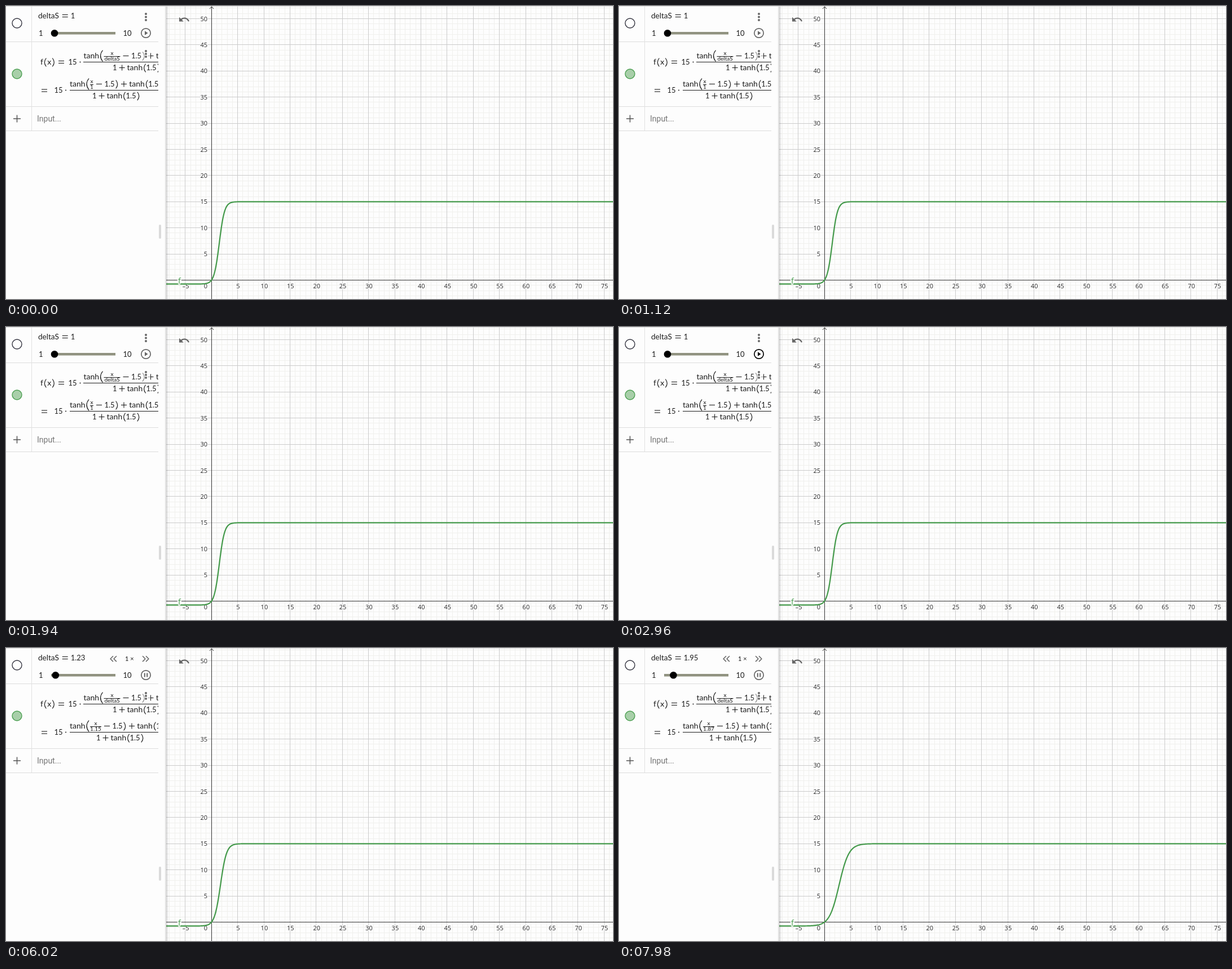
These frames come from a looping animation (1076 px wide and 520 px high, 8000 ms). An HTML page with a canvas:

```html
<!DOCTYPE html>
<html lang="en">
<head>
<meta charset="utf-8">
<title>Slider and function graph</title>
<style>
  html, body { margin: 0; width: 100%; height: 100%; overflow: hidden; background: #fdfdfd; }
  canvas { display: block; }
</style>
</head>
<body>
<canvas id="stage" width="1076" height="520"></canvas>
<script>
const ctx = document.getElementById('stage').getContext('2d');
const LOOP = 8000, W = 1076, H = 520, PANEL = 284, CLIP = 270;
const UNIT = 9.28, X0 = 364.2, Y0 = 486.5;
const INK = '#1c1c1c', GREY = '#666', GREEN = '#43994a', PAPER = '#fdfdfd';
const MATH = 'Lato, sans-serif', AXIS = '"Open Sans", sans-serif';
const undoIcon = new Path2D('M12.5 8c-2.65 0-5.05.99-6.9 2.6L2 7v9h9l-3.62-3.62c1.39-1.16 3.16-1.88 5.12-1.88 3.54 0 6.55 2.31 7.6 5.5l2.37-.78C21.08 11.03 17.15 8 12.5 8z');

const clamp01 = v => Math.min(1, Math.max(0, v));
const crisp = v => Math.floor(v) + 0.5;
const format = v => String(+v.toFixed(2));

function line(points, color = INK, width = 1) {
  ctx.beginPath();
  points.forEach(([x, y]) => ctx.lineTo(x, y));
  ctx.strokeStyle = color;
  ctx.lineWidth = width;
  ctx.stroke();
}

function rect(x, y, w, h, color) {
  ctx.fillStyle = color;
  ctx.fillRect(x, y, w, h);
}

function circle(x, y, r, fill, stroke, width = 1.4) {
  ctx.beginPath();
  ctx.arc(x, y, r, 0, 7);
  if (fill) { ctx.fillStyle = fill; ctx.fill(); }
  if (stroke) { ctx.strokeStyle = stroke; ctx.lineWidth = width; ctx.stroke(); }
}

function text(s, x, y, { size = 14, font = MATH, color = INK, align = 'left', halo = 0 } = {}) {
  ctx.font = `${size}px ${font}`;
  ctx.textAlign = align;
  if (halo) {
    ctx.strokeStyle = PAPER;
    ctx.lineWidth = halo;
    ctx.lineJoin = 'round';
    ctx.strokeText(s, x, y);
  }
  ctx.fillStyle = color;
  ctx.fillText(s, x, y);
}

const number = (s, x, y) => text(s, x, y, { size: 13 });

// Operators are centred on the maths axis, 4.5 px above the baseline.
const minus = (x, y) => line([[x, y - 4.5], [x + 10, y - 4.5]], INK, 1.1);
function plus(x, y) {
  minus(x, y);
  line([[x + 5, y - 9.5], [x + 5, y + 0.5]], INK, 1.1);
}
function equals(x, y) {
  for (const dy of [-6.5, -2.5]) line([[x, y + dy], [x + 10, y + dy]], INK, 1.1);
}

function paren(x, y, height, bulge) {
  ctx.beginPath();
  ctx.moveTo(x, y - height / 2);
  ctx.quadraticCurveTo(x + bulge * 2, y, x, y + height / 2);
  ctx.strokeStyle = INK;
  ctx.lineWidth = 1.2;
  ctx.stroke();
}

function tanhConstant(x, y) {
  text('tanh', x, y);
  paren(x + 33, y - 4, 15, -3);
  number('1.5', x + 33.9, y);
  paren(x + 54.2, y - 4, 15, 3);
}

function onePlusTanh(x, y) {
  number('1', x, y);
  plus(x + 11.6, y);
  tanhConstant(x + 25.6, y);
}

// tanh(x / divisor − 1.5) + tanh(1.5)
function numerator(x, y, divisor, width) {
  const left = x + 36, right = left + width, middle = left + width / 2;
  text('tanh', x, y);
  paren(x + 34, y - 4.5, 20, -4);
  text('x', middle, y - 6.5, { size: 10, align: 'center' });
  line([[left, y - 3.5], [right, y - 3.5]]);
  text(divisor, middle, y + 4, { size: 10, align: 'center' });
  minus(right + 5, y);
  number('1.5', right + 19.5, y);
  paren(right + 39.7, y - 4, 15, 3);
  plus(right + 49, y);
  tanhConstant(right + 63.3, y);
}

function dots(x, y, gap) {
  for (const k of [-1, 0, 1]) circle(x, y + k * gap, 2, GREY);
}

function gridLines(step, color) {
  for (let n = Math.ceil(-9 / step) * step; n < 78; n += step) {
    const x = crisp(X0 + n * UNIT), y = crisp(Y0 - n * UNIT);
    line([[x, 0], [x, H]], color);
    if (y > 0 && y < H) line([[PANEL, y], [W, y]], color);
  }
}

function drawGraph(delta) {
  const axisX = crisp(X0);
  gridLines(1, '#f0f0ed');
  gridLines(5, '#cbcbcb');
  line([[PANEL, Y0], [W, Y0]], '#333');
  line([[axisX, 0], [axisX, H]], '#333');
  line([[axisX - 3.5, 5], [axisX, 1], [axisX + 3.5, 5]], '#333');

  const label = { size: 11, font: AXIS, color: '#222', halo: 3 };
  for (let n = -5; n <= 75; n += 5) {
    const caption = String(n).replace('-', '–');
    if (n) text(caption, X0 + n * UNIT + 0.9, 501, { ...label, align: 'center' });
    if (n > 0 && n <= 50) text(caption, 357, Math.round(Y0 - n * UNIT + 4), { ...label, align: 'right' });
  }
  text('0', 357, 501, { ...label, align: 'right' });

  const shift = Math.tanh(1.5), curve = [];
  for (let px = PANEL - 2; px <= W + 2; px++) {
    const x = (px - X0) / UNIT;
    const y = 15 * (Math.tanh(x / delta - 1.5) + shift) / (1 + shift);
    curve.push([px, Y0 - y * UNIT]);
  }
  line(curve, GREEN, 2.2);
  text('f', 305, 493, { size: 14, font: AXIS, color: GREEN, halo: 3 });

  ctx.save();
  ctx.translate(305.2, 13.5);
  ctx.scale(0.88, 0.88);
  ctx.fillStyle = GREY;
  ctx.fill(undoIcon);
  ctx.restore();
}

function drawPanelFrame() {
  rect(0, 0, PANEL, H, PAPER);
  const shade = ctx.createLinearGradient(281, 0, 288, 0);
  shade.addColorStop(0, 'rgba(0,0,0,0)');
  shade.addColorStop(0.45, 'rgba(0,0,0,.16)');
  shade.addColorStop(1, 'rgba(0,0,0,0)');
  rect(281, 0, 7, H, shade);
  line([[0, 0.5], [W, 0.5]], '#dedede');
  for (const y of [63.5, 178.5, 221.5]) line([[0, y], [CLIP, y]], '#dcdcdc');
  line([[45.5, 0], [45.5, 221]], '#e2e2e2');

  ctx.beginPath();
  ctx.roundRect(271, 388, 4, 25, 2);
  ctx.fillStyle = '#dadada';
  ctx.fill();

  circle(19.5, 30.5, 8.5, '#fff', '#33333f');
  circle(19.5, 120.5, 8.5, '#a8cfa9', '#4c9f52');
  line([[13, 200], [26, 200]], '#555', 1.5);
  line([[19.5, 193.5], [19.5, 206.5]], '#555', 1.5);
  text('Input...', 55, 204.5, { font: 'Roboto, sans-serif', color: '#757575' });
}

function drawPlayButton(playing, hovered) {
  const color = hovered ? '#000' : GREY;
  circle(248, 48, 8.2, null, color, 1.7);
  if (playing) {
    rect(244.8, 44.5, 2, 7, color);
    rect(249.2, 44.5, 2, 7, color);
  } else {
    ctx.beginPath();
    ctx.moveTo(246, 44.2);
    ctx.lineTo(251.5, 48);
    ctx.lineTo(246, 51.8);
    ctx.fillStyle = color;
    ctx.fill();
  }
}

function chevrons(x, dir) {
  for (const dx of [-3, 3])
    line([[x + dx - dir * 2.4, 14.3], [x + dx + dir * 2.4, 19.2], [x + dx - dir * 2.4, 24.1]], GREY, 1.6);
}

function drawSlider(t, shown, delta) {
  text('deltaS', 57, 22, { size: 13.6 });
  equals(99.7, 22);
  number(format(shown), 114.7, 22);
  number('1', 58, 53);
  number('10', 207.5, 53);
  rect(80, 46, 114, 4.5, '#909280');
  circle(86 + (delta - 1) * 12, 48.2, 6.3, '#000');
  drawPlayButton(t >= 4920, t >= 2540 && t < 5720);

  const reveal = clamp01((t - 4890) / 450);
  ctx.globalAlpha = 1 - clamp01((t - 4920) / 300);
  dots(248, 19.5, 5.5);
  ctx.globalAlpha = reveal;
  chevrons(190.5, -1);
  text('1 ×', 211, 23, { size: 11 });
  chevrons(247.5, 1);
  ctx.globalAlpha = 1;
}

function drawFormulas(delta) {
  ctx.save();
  ctx.beginPath();
  ctx.rect(0, 64, CLIP, 114);
  ctx.clip();

  text('f', 61, 104);
  paren(71.3, 100, 15, -3);
  text('x', 73.3, 104);
  paren(82.3, 100, 15, 3);
  equals(93, 104);
  number('15', 110.5, 104);
  circle(131.5, 99.5, 1, INK);
  line([[137, 99.5], [CLIP, 99.5]]);
  numerator(137.5, 93, 'deltaS', 29);
  onePlusTanh(189, 114);

  const fade = ctx.createLinearGradient(236, 0, 248, 0);
  fade.addColorStop(0, 'rgba(253,253,253,0)');
  fade.addColorStop(1, 'rgba(253,253,253,.75)');
  rect(236, 76, 12, 20, fade);
  rect(248, 76, 8, 20, 'rgba(253,253,253,.6)');
  dots(248, 85, 5);

  const divisor = format(delta);
  const width = [0, 6, 6, 14, 20][divisor.length];
  const widen = width - 6;
  equals(63, 154.5);
  number('15', 85.5, 154);
  circle(106, 149.5, 1, INK);
  line([[113, 149.5], [CLIP, 149.5]]);
  numerator(113, 143, divisor, width);
  onePlusTanh(153 + widen / 2, 164);
  ctx.restore();
}

function draw(t) {
  // The slider label runs two ticks ahead of the drawing.
  const label = 1.55 + 0.04 * Math.floor((t - 6840) / 114);
  const shown = Math.max(1, label), delta = Math.max(1, label - 0.08);
  rect(0, 0, W, H, PAPER);
  drawGraph(delta);
  drawPanelFrame();
  drawSlider(t, shown, delta);
  drawFormulas(delta);
}

const start = performance.now();
function tick() {
  draw((performance.now() - start) % LOOP);
  requestAnimationFrame(tick);
}
tick();
</script>
</body>
</html>
```
